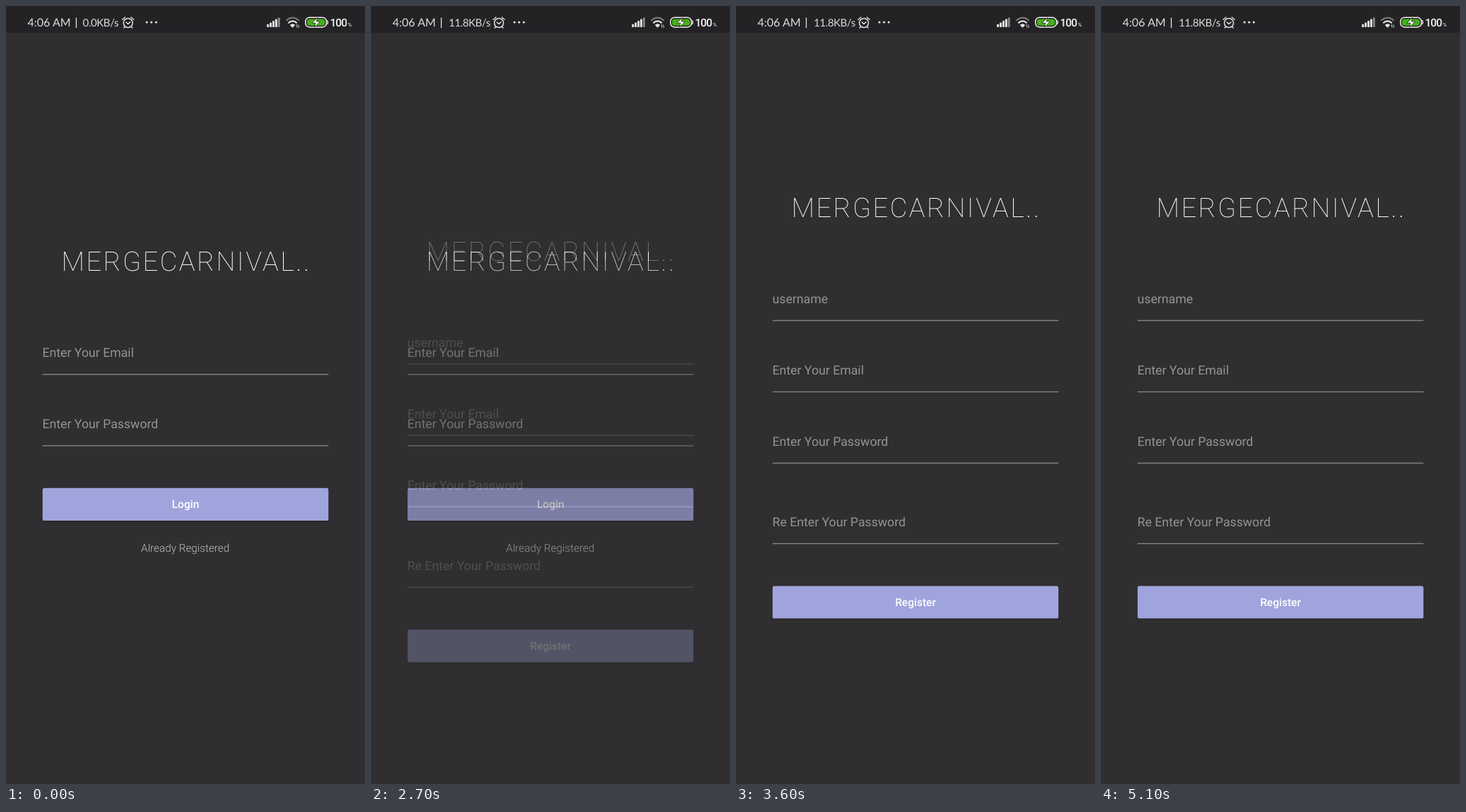
An HTML page that plays this animation: 508 px wide and 1102 px high, repeating every 5200 ms.

```html
<!DOCTYPE html>
<html lang="en">
<head>
<meta charset="utf-8">
<title>Login and register</title>
<style>
  html, body { margin: 0; width: 100%; height: 100%; overflow: hidden; background: #302e30; }
  svg { display: block; width: 100%; height: 100%; }
  text { font-family: Roboto, sans-serif; white-space: pre; text-rendering: geometricPrecision; }
  .title { font-size: 38px; font-weight: 100; letter-spacing: 2.5px; fill: #fff; text-anchor: middle; }
  .label { font-size: 17.7px; fill: #959495; }
  .rule { fill: #858485; }
  .button { fill: #a0a4dc; filter: drop-shadow(0 1.5px 1.2px rgba(0, 0, 0, .35)); }
  .action { font-size: 15.5px; font-weight: 500; fill: #fff; text-anchor: middle; }
  .link { font-size: 15.3px; font-weight: 300; fill: #bfbebf; text-anchor: middle; }
  .status text { font: 400 16px Lato, sans-serif; fill: #dcdbdc; }
  .status .speed { font-size: 15px; letter-spacing: -.4px; }
  .status .level { font: 500 15.5px Roboto, sans-serif; letter-spacing: -.9px; fill: #f2f2f2; }
  .status .percent { font: 500 7px Roboto, sans-serif; }
  .icon { fill: none; stroke: #e2e1e2; stroke-width: 1.5; stroke-linecap: round; stroke-linejoin: round; }
</style>
</head>
<body>
<svg viewBox="0 0 508 1102" preserveAspectRatio="none">
  <g id="login"></g>
  <g id="register"></g>
  <g class="status">
    <rect width="508" height="38" fill="#242225"/>
    <text x="30.5" y="29">4:06 AM</text>
    <rect x="98.8" y="16.5" width="1.3" height="14.5" fill="#e2e1e2"/>
    <text id="speed" class="speed" y="28.8"></text>
    <g id="alarm" class="icon">
      <circle cy="24" r="6.5"/>
      <path d="M-8 19.3L-4.2 16M8 19.3L4.2 16M-2.8 23L0 25.5L3 22.7M-4.6 29.5L-6 31M4.6 29.5L6 31"/>
    </g>
    <g id="dots" fill="#e2e1e2">
      <circle cx="-6.6" cy="23" r="1.6"/><circle cy="23" r="1.6"/><circle cx="6.6" cy="23" r="1.6"/>
    </g>
    <g id="signal"></g>
    <g fill="none" stroke-width="2.1">
      <path d="M396.3 20.8Q405.5 12.6 414.7 20.8" stroke="#777578"/>
      <path d="M399.3 24.2Q405.5 18.6 411.7 24.2" stroke="#e8e8e8"/>
    </g>
    <path d="M401.8 26.9Q405.5 23.6 409.2 26.9L405.5 30.8Z" fill="#e8e8e8"/>
    <path d="M411.6 30.5V26.3M410.5 27.4L411.6 26.2M413.9 26.3V30.5M415 29.4L413.9 30.6" fill="none" stroke="#d0d0d0" stroke-width=".9"/>
    <rect x="423.8" y="16.3" width="29.6" height="13.6" rx="5.5" fill="#242225" stroke="#f2f2f2" stroke-width="1.5"/>
    <rect x="426" y="18.4" width="25.2" height="9.4" rx="3.6" fill="#45b016"/>
    <path d="M454.6 20.2Q456.4 23 454.6 26" fill="none" stroke="#f2f2f2" stroke-width="1.2"/>
    <path d="M440.5 16.4L433 24.1H438L436.7 30L444.4 22H439.4Z" fill="#fff" stroke="#242225" stroke-width=".8"/>
    <text class="level" x="458.4" y="28.9">100</text>
    <text class="percent" x="484" y="28.5">%</text>
  </g>
</svg>
<script>
const $ = id => document.getElementById(id);
const LOOP = 5200, STEP = 100, SPEED_AT = 1500, OPEN_AT = 2700;

const title = y => `<text class="title" x="255" y="${y}">MERGECARNIVAL..</text>`;
const field = (label, y) =>
  `<text class="label" x="51.5" y="${y}">${label}</text>
   <rect class="rule" x="51.7" y="${y + 23.8}" width="404.6" height="1.4"/>`;
const button = (label, y) =>
  `<rect class="button" x="51.7" y="${y}" width="404.6" height="46.2" rx="2.6"/>
   <text class="action" x="254" y="${y + 28.4}">${label}</text>`;

$('login').innerHTML = title(375.3) + field('Enter Your Email', 497.3) +
  field('Enter Your Password', 598.4) + button('Login', 682.8) +
  '<text class="link" x="253.7" y="773.3">Already Registered</text>';

$('register').innerHTML = '<rect width="508" height="1102" fill="#302e30"/>' +
  title(299.2) + field('username', 421) + field('Enter Your Email', 522) +
  field('Enter Your Password', 623) + field('Re Enter Your Password', 737) +
  button('Register', 821.4);

$('signal').innerHTML = [0, 1, 2, 3, 4].map(i => {
  const h = 4.2 + i * 2.4;
  return `<rect x="${369.2 + i * 3.9}" y="${30 - h}" width="2.9" height="${h}" rx=".8"
    fill="${i < 4 ? '#e8e8e8' : '#8a888b'}"/>`;
}).join('');

// Cubic Bezier easing, solved by bisection
function ease(x1, y1, x2, y2, x) {
  if (x <= 0 || x >= 1) return x <= 0 ? 0 : 1;
  const at = (a, b, u) => 3 * a * u * (1 - u) ** 2 + 3 * b * u * u * (1 - u) + u ** 3;
  let lo = 0, hi = 1;
  for (let i = 0; i < 24; i++) {
    const mid = (lo + hi) / 2;
    if (at(x1, x2, mid) < x) lo = mid; else hi = mid;
  }
  return at(y1, y2, lo);
}

function draw(time) {
  const t = Math.floor((time % LOOP) / STEP) * STEP;

  const busy = t >= SPEED_AT;
  $('speed').textContent = busy ? '11.8KB/s' : '0.0KB/s';
  $('speed').setAttribute('x', busy ? 110 : 108.6);
  $('alarm').setAttribute('transform', `translate(${busy ? 181 : 172.7})`);
  $('dots').setAttribute('transform', `translate(${busy ? 209.6 : 205.8})`);

  // The new page fades in while it slides up a quarter of the stage
  const p = t < OPEN_AT ? 0 : Math.min(1, 0.5 + (t - OPEN_AT) * 0.0039);
  const shift = 275.5 * (1 - ease(0.4, 0, 0.2, 1, p));
  $('register').setAttribute('transform', `translate(0 ${shift.toFixed(2)})`);
  $('register').setAttribute('opacity', ease(0.42, 0, 1, 1, p).toFixed(3));
}

const start = performance.now();
function tick() {
  draw(performance.now() - start);
  requestAnimationFrame(tick);
}
tick();
</script>
</body>
</html>
```
